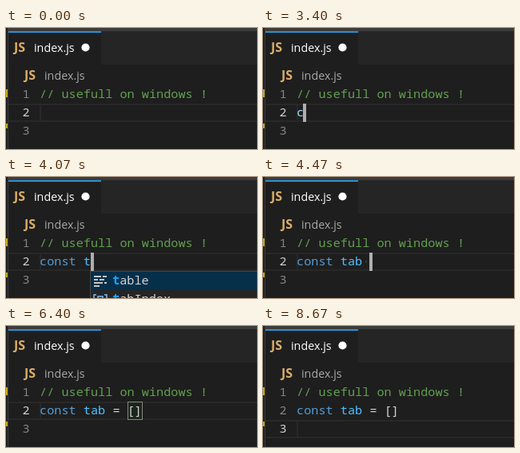
Animation, 314 px wide and 152 px high, one loop 8870 ms. Source, as an HTML page with a canvas:

```html
<!DOCTYPE html>
<html lang="en">
<head>
<meta charset="utf-8">
<title>Code editor</title>
<style>
  html, body { margin: 0; width: 100%; height: 100%; overflow: hidden; background: #1e1e1e; }
  canvas { display: block; width: 314px; height: 152px; }
</style>
</head>
<body>
<canvas id="stage" width="314" height="152"></canvas>
<script>
const ctx = document.getElementById('stage').getContext('2d');
const LOOP = 8870, LEFT = 42, CHAR = 9.14, ROW = 23;
const MONO = '15.23px "Noto Sans Mono", monospace';
const SANS = '500 14.3px "Open Sans", sans-serif';
const colX = col => LEFT + col * CHAR;
const lineY = line => 72 + (line - 1) * ROW;

// [tick, text of line 2, caret column, popup open]; 15 ticks per second
const typing = [
  [0, '', 0], [50, 'c', 0.55], [51, 'c', 0.9], [52, 'c', 1, true],
  [53, 'co', 2, true], [54, 'con', 3, true], [55, 'cons', 4, true],
  [57, 'const', 4.85, true], [58, 'const ', 6],
  [61, 'const t', 7, true], [64, 'const ta', 8, true], [65, 'const tab', 9, true],
  [67, 'const tab ', 10], [72, 'const tab =', 11], [75, 'const tab = ', 12],
  [84, 'const tab = []', 13], [85, 'const tab = []', 14]
];

function rect(x, y, w, h, color) {
  ctx.fillStyle = color;
  ctx.fillRect(x, y, w, h);
}

function text(str, x, y, color, font = '500 ' + MONO) {
  ctx.font = font;
  ctx.fillStyle = color;
  ctx.fillText(str, x, y);
}

function disc(x, y, r, color) {
  ctx.fillStyle = color;
  ctx.beginPath();
  ctx.arc(x, y, r, 0, 2 * Math.PI);
  ctx.fill();
}

function fileLabel(x, y, color) {
  text('JS', x, y, '#dcae68', 'bold 16px "Open Sans", sans-serif');
  text('index.js', x + 25, y, color, SANS);
}

function drawChrome() {
  rect(0, 0, 314, 152, '#1e1e1e');
  rect(2, 0, 312, 4, '#3c3c3c');
  rect(3, 4, 311, 42, '#252526');
  rect(3, 4, 116, 42, '#1e1e1e');
  rect(3, 4, 116, 2, '#2f8fd0');
  rect(2, 0, 1, 152, '#3c3c3c');
  rect(0, 77, 2, 10, '#c5a80c');
  rect(0, 120, 2, 6, '#c5a80c');
  fileLabel(10, 30, '#ffffff');
  disc(99.5, 24.5, 5.1, '#ffffff');
  fileLabel(23, 65, '#a9a9a9');
}

function drawLines(activeLine) {
  const top = lineY(activeLine);
  rect(3, top, 311, 2, '#282828');
  rect(3, top + ROW - 2, 311, 2, '#282828');
  rect(LEFT, top, 2, ROW, '#282828');
  for (let n = 1; n <= 3; n++) {
    text(n, 20.5, lineY(n) + 16, n === activeLine ? '#d0d0d0' : '#858585');
  }
  text('// usefull on windows !', LEFT, lineY(1) + 16, '#61a04f');
}

function drawCode(code, tick) {
  const y = lineY(2) + 16;
  if (code.endsWith('[]') && tick < 125) {
    rect(152, 95, 19, ROW, '#1b251b');
    ctx.lineWidth = 1;
    ctx.strokeStyle = '#888880';
    ctx.strokeRect(152.5, 95.5, 18, ROW - 1);
  }
  text(code.slice(0, 5), LEFT, y, code.startsWith('const') ? '#569cd6' : '#9cdcfe');
  text(code.slice(6, 9), colX(6), y, '#4fc1ff');
  text(code.slice(10), colX(10), y, '#d4d4d4');
  if (code.endsWith(' ')) disc(colX(code.length - 0.5), 106.5, 1, '#4a4a46');
  if (tick >= 81 && tick < 90) {
    ctx.strokeStyle = '#f14c4c';
    ctx.lineWidth = 1.2;
    ctx.beginPath();
    for (let i = 0; i <= 4; i++) ctx.lineTo(134 + i * 2.5, i % 2 ? 115.5 : 117.5);
    ctx.stroke();
  }
}

function drawPopup(code) {
  const word = code.split(' ').pop();
  const items = word[0] === 'c' ? ['const', 'ConstantSourceNode'] : ['table', 'tabIndex'];
  const x = Math.round(colX(code.length)) - 1;
  rect(x, 118, 314, 34, '#454545');
  rect(x + 1, 119, 314, 33, '#252526');
  rect(x + 1, 119, 314, ROW, '#062f4a');
  items.forEach((item, i) => {
    const y = 135 + i * ROW, tx = x + 28;
    text(item.slice(0, word.length), tx, y, '#18a3ff', 'bold ' + MONO);
    text(item.slice(word.length), tx + word.length * CHAR, y, '#d4d4d4');
  });
  for (const [dx, y, w] of [[5, 124, 9], [16, 124, 5], [5, 128, 5], [12, 128, 6], [5, 132, 11], [18, 132, 3], [5, 136, 7]]) {
    rect(x + dx, y, w, 2, '#c5c5c5');
  }
  ctx.strokeStyle = '#75beff';
  ctx.lineWidth = 1.5;
  ctx.strokeRect(x + 10, 150, 6, 6);
  for (const side of [-1, 1]) {
    ctx.beginPath();
    ctx.moveTo(x + 13 + side * 5, 148);
    ctx.lineTo(x + 13 + side * 8, 148);
    ctx.lineTo(x + 13 + side * 8, 160);
    ctx.stroke();
  }
}

// Smooth blink: one second period, eased fades of three ticks
function blink(tick) {
  if (tick < 93 || tick >= 125) return 1;
  const phase = (tick - 93) % 15;
  const k = Math.min(1, Math.max(0, phase < 9 ? 1 - phase / 3 : (phase - 9) / 3));
  return k * k * (3 - 2 * k);
}

function drawCaret(col, tick) {
  if (tick < 35 || tick >= 130) return;
  let line = 2;
  if (tick < 40) line = [3, 2.6, 2.15][Math.max(0, tick - 37)];
  if (tick >= 125) {
    const left = tick === 125 ? 0.4 : 0;
    line = 3 - left;
    col *= left;
  }
  ctx.globalAlpha = blink(tick);
  rect(Math.round(colX(col)), Math.round(lineY(line)), 4, ROW, '#aeafad');
  ctx.globalAlpha = 1;
}

function draw(now) {
  const tick = Math.floor((now % LOOP + 4) * 0.015);
  const [, code, col, popup] = typing.filter(step => step[0] <= tick).pop();
  const onLine3 = (tick >= 35 && tick < 38) || tick >= 125;
  drawChrome();
  drawLines(onLine3 ? 3 : 2);
  drawCode(code, tick);
  if (popup) drawPopup(code);
  drawCaret(col, tick);
}

const start = performance.now();
function loop() {
  draw(performance.now() - start);
  requestAnimationFrame(loop);
}
loop();
</script>
</body>
</html>
```
